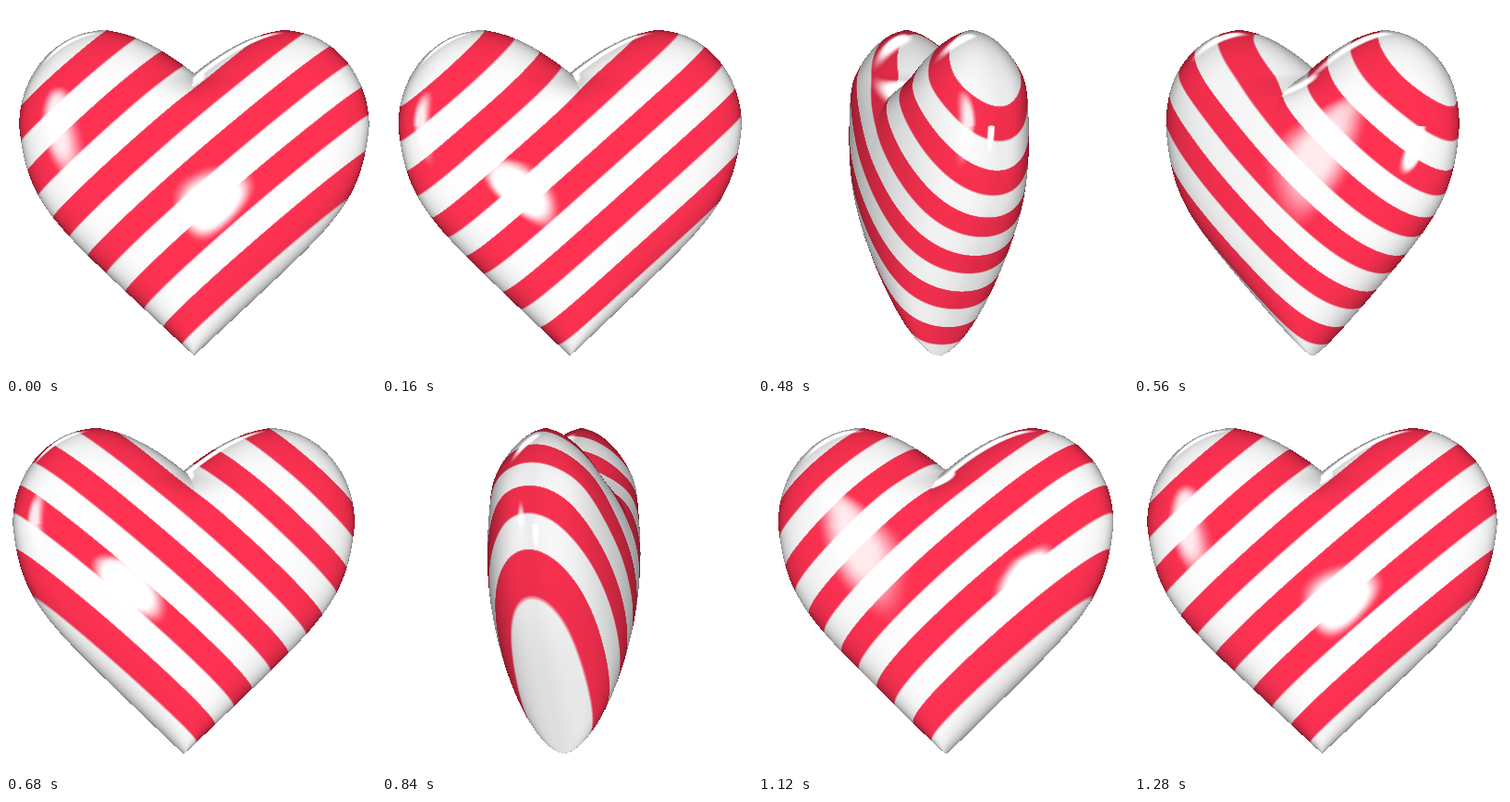
An HTML page with a canvas that plays this animation: 400x400 px, repeating every 1320 ms.

```html
<!DOCTYPE html>
<html>
<head>
<meta charset="utf-8">
<style>
html, body { margin: 0; width: 100%; height: 100%; overflow: hidden; background: #fff; }
canvas { display: block; width: 400px; height: 400px; }
</style>
</head>
<body>
<canvas id="stage" width="400" height="400"></canvas>
<script>
const SIZE = 400, TOP = 26.5, NOTCH = 73, TIP = 378;
const AXIS = 197.7, OFFSET = 5.7, STEPS = 96;
const STEP_MS = 40, LOOP_STEPS = 33;

const ctx = document.getElementById('stage').getContext('2d');
const image = ctx.createImageData(SIZE, SIZE);
const depth = new Float32Array(SIZE);
const clamp = (v, lo = 0, hi = 1) => Math.min(hi, Math.max(lo, v));
const smooth = u => u * u * (3 - 2 * u);

// Cross-section of one lobe at height y: an ellipse with centre m, half width w, half depth c.
function section(y) {
  y = clamp(y, TOP, TIP - 0.01);
  const outer = y < 130
    ? 97 + 92.5 * Math.sqrt(1 - ((130 - y) / 103.5) ** 2)
    : ((1.07 * (TIP - y)) ** -6 + 194 ** -6) ** (-1 / 6);
  const inner = 97 - 97 * ((y - TOP) / (NOTCH - TOP)) ** 0.6;
  const below = y - NOTCH;
  const m = below < 0 ? (outer + inner) / 2 : 87.1 * Math.exp(-below / 260 - (below / 45) ** 2);
  const u = (y - 170) / (y < 170 ? 170 - TOP : TIP - 170);
  return { m, w: outer - m, c: 76 * (1 - u * u) ** 0.6 };
}

const rows = [];
for (let row = 26; row < TIP; row++) {
  const y = Math.max(row + 0.5, TOP + 0.3);
  const { m, w, c } = section(y);
  const before = section(y - 0.5), after = section(y + 0.5);
  const dm = after.m - before.m, dw = after.w - before.w, dc = after.c - before.c;
  const end = Math.acos(clamp(-m / w, -1, 1));
  const points = [];
  for (let i = 0; i <= STEPS; i++) {
    const angle = end * (2 * i / STEPS - 1);
    const cos = Math.cos(angle), sin = Math.sin(angle);
    const nx = c * cos, nz = w * sin;
    const ny = -(nx * (dm + dw * cos) + nz * dc * sin);
    const len = Math.hypot(nx, ny, nz) || 1;
    points.push([m + w * cos, c * sin, nx / len, ny / len, nz / len]);
  }
  rows.push({ row, points });
}

// Soft-edged spot: 1 inside the ellipse around (x, y), 0 outside.
function glow(px, py, x, y, rx, ry, soft) {
  const d = Math.hypot((px - x) / rx, (py - y) / ry);
  return smooth(clamp((1 + soft - d) / (2 * soft)));
}

// Amount of red on the surface; the diagonal stripes bow slightly along their length.
function stripe(x, y, z) {
  const along = (x - 0.85 * (y - 175)) / 1.31;
  const bow = 5.5 * (1 - ((along - 60) / 205) ** 2);
  const s = y + 0.85 * x + 0.045 * z + bow;
  if (s < -80 || s > 380) return 0;
  const phase = (((s - 319) % 73.6) + 73.6) % 73.6;
  return clamp((18.4 - Math.abs(phase - 18.3)) / 3 + 0.5);
}

function paint(px, row, z, nx, ny, nz, cos, sin) {
  const offAxis = px + 0.5 - AXIS;
  const red = stripe(offAxis * cos - z * sin - OFFSET, row + 0.5, offAxis * sin + z * cos);
  const facing = Math.abs(nx * sin + nz * cos);
  const light = Math.min(1, 0.93 + 0.08 * facing) * (1 - 0.55 * (1 - clamp(nz)) ** 2);
  const shine = nz <= 0 ? 0 : Math.max(
    glow(nx, ny, 0.015, 0.1, 0.1, 0.075, 0.3),
    0.9 * glow(nx, ny, -0.48, -0.02, 0.09, 0.13, 0.6),
    glow(Math.hypot(nx, ny), Math.atan2(ny, nx), 0.92, -2.05, 0.04, 0.36, 0.4));
  const mix = (white, tint) => {
    const v = (white + (tint - white) * red) * light;
    return v + (255 - v) * shine;
  };
  const k = (row * SIZE + px) * 4;
  image.data[k] = mix(254, 255);
  image.data[k + 1] = mix(254, 50);
  image.data[k + 2] = mix(254, 82);
}

function draw(theta) {
  const cos = Math.cos(theta), sin = Math.sin(theta);
  image.data.fill(255);
  for (const { row, points } of rows) {
    depth.fill(-1e9);
    for (const side of [1, -1]) {
      let prev = null;
      for (const [px, pz, pnx, ny, pnz] of points) {
        const x = side * px + OFFSET, nx = side * pnx;
        const cur = [AXIS + x * cos + pz * sin, pz * cos - x * sin,
          nx * cos + pnz * sin, ny, pnz * cos - nx * sin];
        if (prev) {
          const [a, b] = prev[0] < cur[0] ? [prev, cur] : [cur, prev];
          for (let i = Math.ceil(a[0] - 0.5); i < b[0] - 0.5; i++) {
            const t = (i + 0.5 - a[0]) / (b[0] - a[0]);
            const at = j => a[j] + (b[j] - a[j]) * t;
            const z = at(1);
            if (z > depth[i]) {
              depth[i] = z;
              paint(i, row, z, at(2), at(3), at(4), cos, sin);
            }
          }
        }
        prev = cur;
      }
    }
  }
  ctx.putImageData(image, 0, 0);
}

let shown = -1;
function tick() {
  const step = Math.floor(performance.now() / STEP_MS) % LOOP_STEPS;
  if (step !== shown) {
    shown = step;
    const turn = smooth(step / (LOOP_STEPS - 1));
    draw((turn * 360 - 3) * Math.PI / 180);
  }
  requestAnimationFrame(tick);
}
tick();
</script>
</body>
</html>
```
